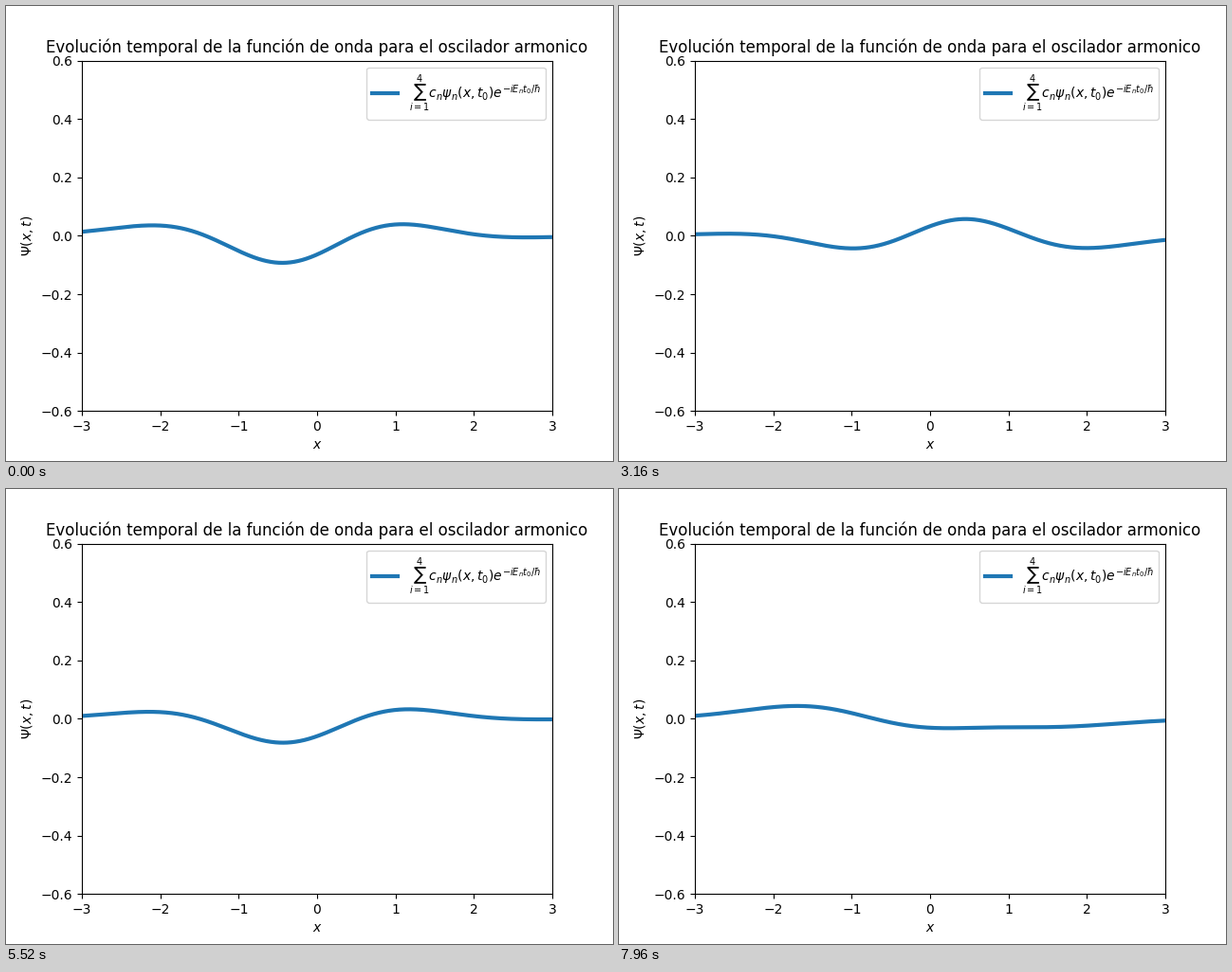
These frames come from a looping animation (640 px wide and 480 px high, 8 s). A matplotlib script:

```python
import math

import numpy as np
import matplotlib.pyplot as plt
from matplotlib.animation import FuncAnimation

FRAMES = 200
INTERVAL = 40  # ms
COEFFS = (-0.05, 0.05, 0.05, -0.05)


def eigenstate(n, x):
    """Normalised harmonic oscillator state (m = omega = hbar = 1)."""
    hermite = np.polynomial.hermite.hermval(x, [0] * n + [1])
    norm = math.sqrt(2**n * math.factorial(n) * math.sqrt(math.pi))
    return hermite * np.exp(-x**2 / 2) / norm


x = np.linspace(-3, 3, 601)
states = np.array([c * eigenstate(n, x) for n, c in enumerate(COEFFS)])
energies = np.arange(len(COEFFS)) + 0.5


def wave(t):
    """Real part of the superposition at time t."""
    return np.cos(energies * t) @ states


fig, ax = plt.subplots(figsize=(6.4, 4.8), dpi=100)
line, = ax.plot(x, wave(0), lw=3,
                label=r"$\sum_{i=1}^{4}c_n\psi_n(x,t_0)e^{-iE_nt_0/\hbar}$")
ax.set_xlim(-3, 3)
ax.set_ylim(-0.6, 0.6)
ax.set_title("Evolución temporal de la función de onda para el oscilador armonico")
ax.set_xlabel("$x$")
ax.set_ylabel(r"$\Psi(x,t)$")
ax.legend(loc="upper right")


def update(t):
    line.set_ydata(wave(t))
    return line,


anim = FuncAnimation(fig, update, frames=FRAMES, interval=INTERVAL,
                     init_func=lambda: update(0), repeat=True, repeat_delay=0)
plt.show()
```
